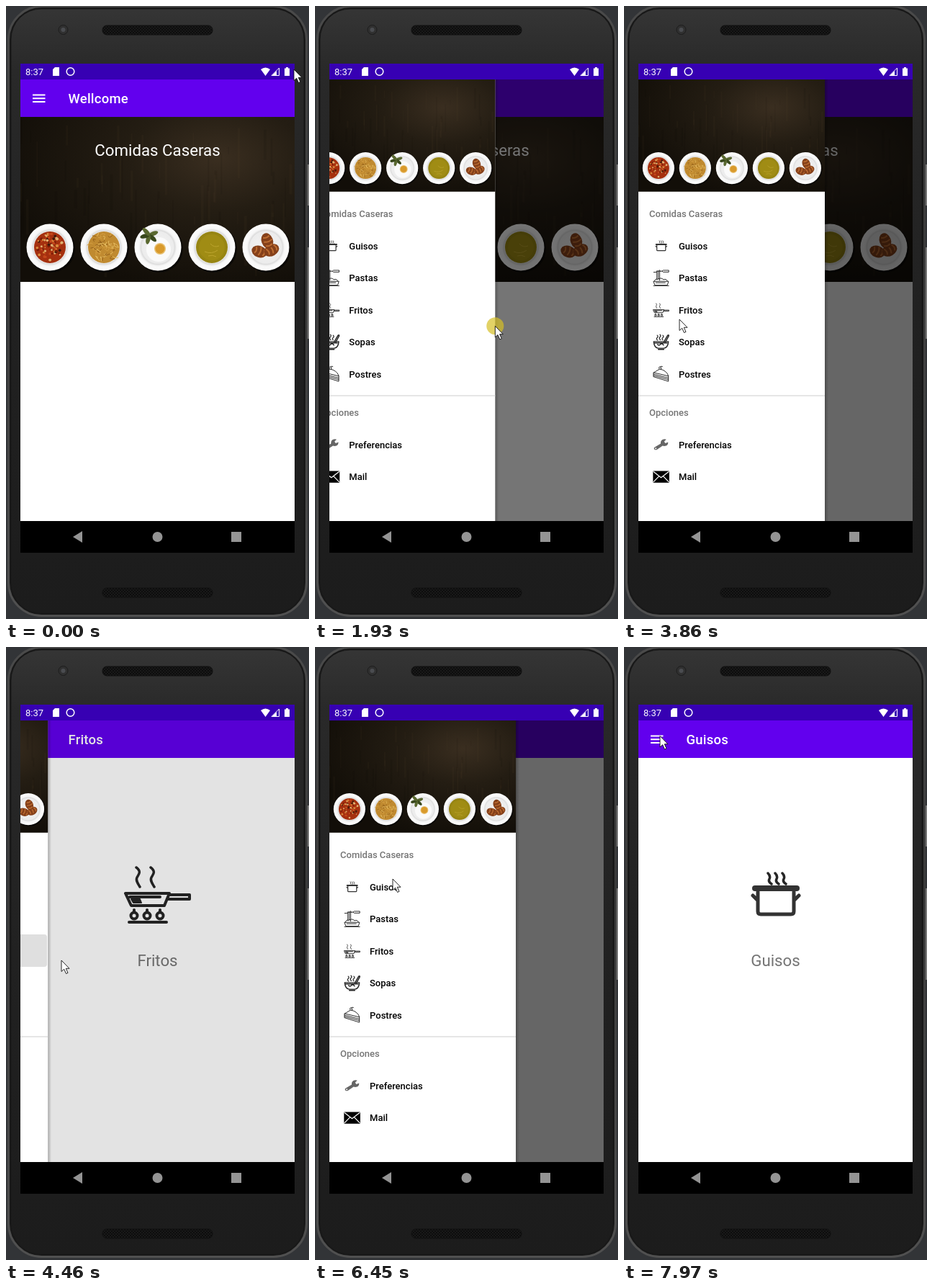
Recreate the animation shown at these times as an HTML page. Size 421 by 851 pixels, loop 8000 ms.

```html
<!DOCTYPE html>
<html lang="es">
<head>
<meta charset="utf-8">
<title>Comidas Caseras</title>
<style>
html, body { margin: 0; width: 100%; height: 100%; overflow: hidden; background: #323437 }
svg { display: block; width: 100%; height: 100% }
text { font: 500 13px Roboto, sans-serif }
.title { font-size: 18.5px; letter-spacing: .23px; fill: #fff }
.big { font-size: 22.25px; font-weight: 400; text-anchor: middle; fill: #757575 }
.sub { fill: #757575 }
.icon { fill: none; stroke: #262626; stroke-width: 4; stroke-linejoin: round; stroke-linecap: round }
</style>
</head>
<body>
<svg viewBox="0 0 421 851">
  <defs>
    <linearGradient id="body" x2="0" y2="1">
      <stop stop-color="#353535"/><stop offset=".1" stop-color="#292929"/>
      <stop offset=".5" stop-color="#212121"/><stop offset="1" stop-color="#1c1c1c"/>
    </linearGradient>
    <linearGradient id="rim" x2="0" y2="1">
      <stop stop-color="#4a4a4a"/><stop offset=".4" stop-color="#3a3a3a"/><stop offset="1" stop-color="#505050"/>
    </linearGradient>
    <linearGradient id="shade">
      <stop stop-opacity=".25"/><stop offset="1" stop-opacity="0"/>
    </linearGradient>
    <radialGradient id="wall" cx=".72" cy=".25" r=".8">
      <stop stop-color="#3a2e20"/><stop offset=".4" stop-color="#241d13"/><stop offset="1" stop-color="#120e08"/>
    </radialGradient>
    <radialGradient id="dish">
      <stop stop-color="#f4f4f4"/><stop offset=".68" stop-color="#ececec"/>
      <stop offset=".72" stop-color="#dcdcdc"/><stop offset=".8" stop-color="#f6f6f6"/><stop offset="1" stop-color="#fff"/>
    </radialGradient>
    <pattern id="mesh" width="4" height="4" patternUnits="userSpaceOnUse">
      <rect width="4" height="4" fill="#191919"/><circle cx="1" cy="1" r="1" fill="#090909"/><circle cx="3" cy="3" r="1" fill="#090909"/>
    </pattern>
    <filter id="soft"><feGaussianBlur stdDeviation=".7"/></filter>
    <clipPath id="view"><path d="M20 102H401V715H20z"/></clipPath>
    <g id="hero"></g>

    <!-- icons live in a 93 unit box -->
    <g id="Guisos" class="icon">
      <path d="M36 17q4 4 2 8t3 7M46 17q4 4 2 8t3 7M56 17q4 4 2 8t3 7" stroke-width="3.5"/>
      <path d="M22 43V70q0 4 4 4H68q4 0 4-4V43M21 54L15 48M73 54L79 48" stroke="#333" stroke-width="5"/>
      <path d="M18 38H76" stroke="#333" stroke-width="8"/>
    </g>
    <g id="Fritos" class="icon">
      <path d="M17 9c8 6 3 10 1 14s1 8 4 13M37 9c8 6 3 10 1 14s1 8 4 13" stroke-width="3.5"/>
      <path d="M2 45H63L56 62H10zM62 47H91V53H61M8 50H50"/>
      <path d="M10 53H22L24 58H13z" fill="#262626" stroke-width="2"/>
      <path d="M7 85H59M14 68V71M32 68V71M50 68V71"/>
      <circle cx="14" cy="76" r="4.5"/><circle cx="32" cy="76" r="4.5"/><circle cx="50" cy="76" r="4.5"/>
    </g>
    <g id="Pastas" class="icon">
      <path d="M20 8H42M38 2V60M30 5V52M22 8V55M42 8H52L58 3H90V13H58L52 8M4 14H20"/>
      <path d="M4 66H89L82 88H12zM8 64q4-14 20-10q18-12 32 2q18-6 22 8M16 74H70M3 91H90"/>
    </g>
    <g id="Sopas" class="icon" stroke-width="6">
      <path d="M4 44H88Q86 78 62 82H30Q6 78 4 44zM30 89H62M10 52H80M62 46L84 8q8-4 6 4L70 48M26 60q8 10 16 0t18 4" stroke-width="6"/>
      <path d="M24 8q8 7 0 14t2 14M40 4q8 7 0 14t2 16M56 8q8 7 0 14t0 12" stroke-width="5"/>
    </g>
    <g id="Postres" class="icon">
      <path d="M4 38L38 18Q76 24 88 56V88L4 62zM4 38L88 58M4 47L88 69M4 55L88 78M36 17q-6-12 4-12t6 14M42 5q6-6 12-2"/>
    </g>
    <g id="Preferencias">
      <path d="M8 62L44 40Q42 24 56 17Q66 13 76 17L64 28L70 38L86 32Q88 46 75 53Q64 57 55 53L20 76Q9 78 6 70Q5 65 8 62z" fill="#666"/>
      <circle cx="16" cy="68" r="4" fill="#fff"/>
    </g>
    <g id="Mail">
      <rect y="14" width="93" height="66" rx="4"/>
      <path d="M2 17L46 52L91 17M2 77L34 44M91 77L59 44" fill="none" stroke="#fff" stroke-width="5"/>
    </g>
  </defs>

  <!-- phone -->
  <path d="M418 220h3v57h-3zM418 335h3v127h-3z" fill="#777"/>
  <rect x="3.5" y=".5" width="414" height="846" rx="46" fill="#181818" stroke="url(#rim)" stroke-width="3"/>
  <rect x="7" y="4" width="407" height="839" rx="42" fill="url(#body)" stroke="#191919"/>
  <circle cx="79.500" cy="33" r="6.500" fill="#303030" stroke="#1d1d1d"/>
  <circle cx="79.500" cy="33" r="3" fill="#4a4c50"/>
  <rect x="134" y="27" width="153" height="13" rx="6" fill="url(#mesh)" stroke="#111"/>
  <rect x="134" y="808" width="153" height="13" rx="6" fill="url(#mesh)" stroke="#111"/>

  <!-- status and navigation bars -->
  <path d="M20 80H401V759H20z"/>
  <path d="M20 80H401V102H20z" fill="#3700b3"/>
  <g fill="#fff">
    <text x="27" y="96" style="font-weight:400">8:37</text>
    <path d="M68 85H74V97H65V88zM354 88q6.500-5 13 0L360.500 97zM387 86.500h2V85h3v1.500h2V97h-7z"/>
    <path d="M369 96.500L379.500 86V96.500z" fill="none" stroke="#fff"/><path d="M369 97L376 90V97z"/>
    <circle cx="89.500" cy="91" r="5.300" fill="none" stroke="#fff" stroke-width="1.500"/>
  </g>
  <g fill="#949494">
    <path d="M93 737L106 729V745z"/><circle cx="210.500" cy="737" r="7"/><path d="M313 730h14v14h-14z"/>
  </g>

  <g clip-path="url(#view)">
    <path d="M20 102H401V715H20z" fill="#fff"/>
    <path d="M20 102H401V154H20z" fill="#6200ee"/>
    <path d="M37 123.500H54.500M37 128.300H54.500M37 133.100H54.500" stroke="#fff" stroke-width="2"/>
    <text id="title" class="title" x="86.500" y="135"></text>
    <g id="home">
      <use href="#hero" x="20" y="154"/>
      <text class="big" x="210.500" y="208" style="fill:#fff">Comidas Caseras</text>
    </g>
    <g id="detail">
      <use id="picture" x="164" y="297" filter="url(#soft)"/>
      <text id="label" class="big" x="210.500" y="443"></text>
    </g>
    <path id="scrim" d="M20 102H401V715H20z"/>
    <g id="drawer">
      <path d="M279 102h5V715h-5z" fill="url(#shade)"/>
      <path d="M20 102H279V715H20z" fill="#fff"/>
      <use href="#hero" transform="translate(20 102) scale(.68)"/>
      <rect id="press" x="20" width="258" height="45" rx="4" fill="#dfdfdf"/>
      <text class="sub" x="35" y="293">Comidas Caseras</text>
      <path d="M20 541H279" stroke="#dedede" stroke-width="1.500"/>
      <text class="sub" x="35" y="569">Opciones</text>
      <g id="menu"></g>
    </g>
  </g>

  <circle id="tap" r="12" fill="#d5bf25" opacity=".7"/>
  <path id="cursor" d="M0 0V15.500L3.700 12.200L6.500 18.500L9 17.400L6.300 11.300H11z" fill="#fff" stroke="#111" stroke-width=".9"/>
</svg>

<script>
const $ = id => document.getElementById(id);
const clamp = v => Math.min(1, Math.max(0, v));
let seed = 7;
const rnd = (a, b) => (seed = seed * 16807 % 2147483647, a + (b - a) * seed / 2147483647);
const repeat = (n, f) => Array.from({ length: n }, (_, i) => f(i)).join('');
const circle = (x, y, r, fill) => `<circle cx="${x}" cy="${y}" r="${r}" fill="${fill}"/>`;
const pick = list => list[Math.floor(rnd(0, list.length))];

// Points scattered evenly within a disc
const scatter = (n, radius, f) => repeat(n, () => {
  const a = rnd(0, 6.283), r = radius * Math.sqrt(rnd(0, 1));
  return f(r * Math.cos(a), r * Math.sin(a));
});

const foods = [
  () => circle(0, 0, 22, '#a5300f') + scatter(75, 19, (x, y) =>
    circle(x, y, rnd(.8, 2.2), pick(['#d98a3c', '#e0b070', '#7a1c08', '#c4471a', '#3c1a0c']))),
  () => circle(0, 0, 22, '#c08a30') + scatter(55, 18, (x, y) =>
    `<path d="M${x} ${y}q${rnd(-7, 7)} ${rnd(-7, 7)} ${rnd(-9, 9)} ${rnd(-5, 5)}" fill="none" stroke="${pick(['#e6bd62', '#d6a042', '#94601a'])}"/>`),
  () => circle(1, 3, 17, '#fafafa') + circle(3, 2, 8, '#e8c070') + circle(3, 2, 6.5, '#d99a2c') +
    repeat(5, i => `<ellipse cx="6" rx="7" ry="3" fill="${i % 2 ? '#39481c' : '#59682f'}" transform="translate(-12 -17) rotate(${i * 62 - 20})"/>`),
  () => circle(0, 0, 22, '#978512') + circle(0, 0, 18, '#a08c14') +
    '<path d="M-10 6q10 4 18-2M-2 -5q5 6 12 3M-5 12q6-2 11 1" fill="none" stroke="#bda52e"/>',
  () => [[-9, 6, 20], [8, 4, -30], [2, -9, 70]].map(([x, y, a]) =>
    `<g transform="translate(${x} ${y}) rotate(${a})"><ellipse rx="11" ry="8" fill="#85401a"/>
     <path d="M-6 -5q3 5 0 9M0 -7q3 6 0 12M6 -5q3 5 0 9" stroke="#bd6d32" stroke-width="2" fill="none"/></g>`).join('')
];

$('hero').innerHTML = '<path d="M0 0H381V229H0z" fill="url(#wall)"/>' +
  repeat(60, () => `<path d="M${rnd(0, 380)} ${rnd(0, 150)}v${rnd(10, 75)}" stroke="${pick(['#000', '#6b5435'])}" stroke-width="${rnd(1, 4)}" opacity=".07"/>`) +
  foods.map((food, i) => `<g transform="translate(${41 + i * 75} 181)">
    ${circle(2, 2, 33, '#0008')}${circle(0, 0, 32.5, 'url(#dish)')}${food()}</g>`).join('');

const rows = { Guisos: 333, Pastas: 377.5, Fritos: 422, Sopas: 466.5, Postres: 511, Preferencias: 609, Mail: 653.5 };
$('menu').innerHTML = Object.entries(rows).map(([name, y]) =>
  `<use href="#${name}" transform="translate(40.3 ${y - 11.3}) scale(.243)"/><text x="76" y="${y + 4.5}">${name}</text>`).join('');

// Pointer path: time, x, y
const path = [
  [0, 400, 88], [70, 400, 88], [500, 22, 415], [560, 22, 418], [940, 366, 441], [1010, 379, 446],
  [1340, 379, 446], [1600, 340, 446], [1790, 340, 446], [2200, 12, 440], [2600, 27, 150],
  [2620, 27, 150], [2830, 43, 126], [3100, 43, 126], [3850, 77, 435], [4580, 77, 435],
  [5350, 46, 126], [5650, 46, 126], [6440, 108, 322], [6460, 108, 322], [6580, 108, 331],
  [7430, 108, 331], [7960, 50, 123.5], [8000, 50, 123.5]
];
const presses = [[520, 960], [1790, 2210], [2850, 2940], [4140, 4280], [5390, 5490], [6600, 6730]];

function pointer(t) {
  const i = path.findIndex(p => p[0] > t);
  const [t0, x0, y0] = path[i - 1], [t1, x1, y1] = path[i];
  const u = (t - t0) / (t1 - t0), e = u * u * (3 - 2 * u);
  return [x0 + (x1 - x0) * e, y0 + (y1 - y0) * e];
}

// Share of the drawer that is out: dragged at first, then settling by itself
function slide(t, x) {
  if (t < 1790) return clamp((t - 560) / 390);
  if (t < 2200) return clamp((x - 20) / 259);
  const rest = start => (1 - clamp((t - start) / 512)) ** 5;
  if (t < 4298) return 1 - rest(2950);
  if (t < 5500) return rest(4298);
  if (t < 6740) return 1 - rest(5500);
  return rest(6740);
}

function draw(t) {
  const [x, y] = pointer(t), out = slide(t, x);
  const page = t < 4310 ? 'Wellcome' : t < 6750 ? 'Fritos' : 'Guisos';
  const home = page === 'Wellcome';
  $('title').textContent = page;
  $('home').style.display = home ? '' : 'none';
  $('detail').style.display = home ? 'none' : '';
  if (!home) {
    $('label').textContent = page;
    $('picture').setAttribute('href', '#' + page);
  }
  $('scrim').setAttribute('opacity', .6 * out ** .88);
  $('drawer').setAttribute('transform', `translate(${259 * (out - 1)} 0)`);
  $('drawer').style.display = out > .002 ? '' : 'none';

  const held = t > 4180 && t < 4700 ? 'Fritos' : t > 6640 && t < 7150 ? 'Guisos' : '';
  $('press').style.display = held ? '' : 'none';
  if (held) $('press').setAttribute('y', rows[held] - 23);

  const at = `translate(${x} ${y})`;
  $('cursor').setAttribute('transform', at);
  $('tap').setAttribute('transform', at);
  $('tap').style.display = presses.some(([a, b]) => t >= a && t < b) ? '' : 'none';
}

const begin = performance.now();
function tick() {
  draw((performance.now() - begin) % 8000);
  requestAnimationFrame(tick);
}
tick();
</script>
</body>
</html>
```
